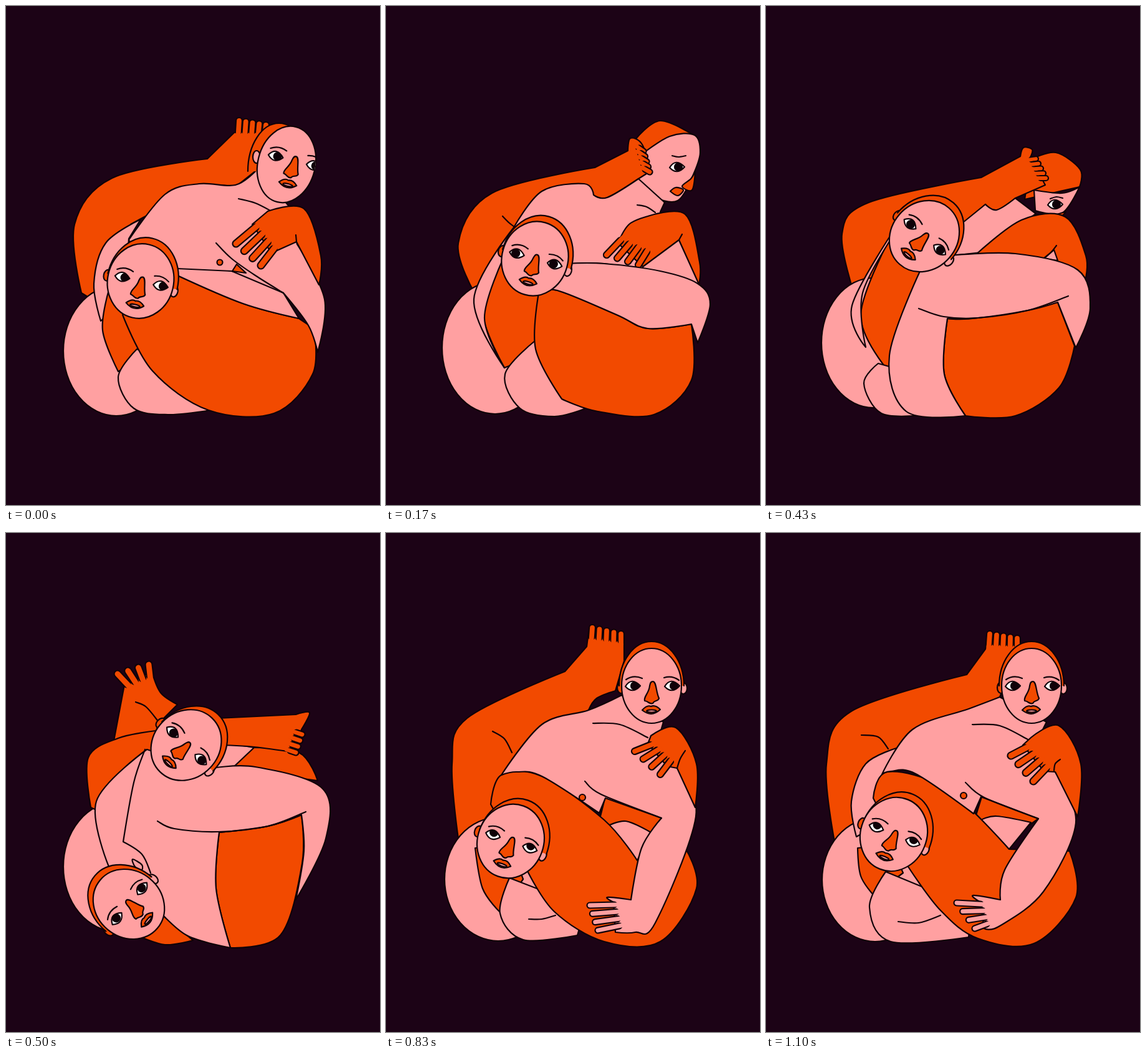
These frames come from a looping animation (600x800 px, 1170 ms). An HTML page with a canvas:

```html
<!DOCTYPE html>
<html lang="en">
<head>
<meta charset="utf-8">
<title>Embrace</title>
<style>
html, body { margin: 0; width: 100%; height: 100%; overflow: hidden; background: #1c0316; }
canvas { display: block; }
</style>
</head>
<body>
<canvas width="600" height="800"></canvas>
<script>
const ctx = document.querySelector('canvas').getContext('2d');
const ORANGE = '#f24a00', PINK = '#ffa0a1', INK = '#100208', NIGHT = '#1c0316';
const LINE = 2.2, LOOP = 1170;

// Smooth curve through a few "x,y" key points; a star marks a corner.
function curve(text, closed) {
  const pts = text.split(' ').map(s => [parseFloat(s), parseFloat(s.split(',')[1]), s.endsWith('*')]);
  const n = pts.length, path = new Path2D();
  const at = i => pts[closed ? (i + n) % n : Math.max(0, Math.min(n - 1, i))];
  const handle = (i, dir) => {
    const [x, y, corner] = at(i), a = at(i - 1), b = at(i + 1), k = corner ? 0 : dir / 6;
    return [x + (b[0] - a[0]) * k, y + (b[1] - a[1]) * k];
  };
  path.moveTo(pts[0][0], pts[0][1]);
  for (let i = 0; i < (closed ? n : n - 1); i++) {
    const end = at(i + 1);
    path.bezierCurveTo(...handle(i, 1), ...handle(i + 1, -1), end[0], end[1]);
  }
  if (closed) path.closePath();
  return path;
}

function paint(path, color) {
  if (color) { ctx.fillStyle = color; ctx.fill(path); }
  ctx.stroke(path);
}
function oval(x, y, rx, ry, color, from = 0, to = 2 * Math.PI) {
  const path = new Path2D();
  path.ellipse(x, y, rx, ry, 0, from, to);
  paint(path, color);
  return path;
}
const orange = pts => paint(curve(pts, true), ORANGE);
const pink = pts => paint(curve(pts, true), PINK);
const line = pts => paint(curve(pts, false));

function bar(x1, y1, x2, y2, width, color) {
  ctx.save();
  ctx.lineWidth = width;
  ctx.strokeStyle = color;
  ctx.beginPath();
  ctx.moveTo(x1, y1);
  ctx.lineTo(x2, y2);
  ctx.stroke();
  ctx.restore();
}

// A row of fingers or toes, spread evenly between the first and the last [root, tip].
function digits(color, count, width, first, last) {
  for (let i = 0; i < count; i++) {
    const [x, y, tipX, tipY] = first.map((v, k) => v + (last[k] - v) * i / (count - 1));
    const inward = 6 / Math.hypot(tipX - x, tipY - y);
    bar(x, y, tipX, tipY, width + LINE, INK);
    bar(x - (tipX - x) * inward, y - (tipY - y) * inward, tipX, tipY, width - LINE, color);
  }
}

const ALMOND = new Path2D('M-12 1Q-2 -15 12 0Q0 14 -12 1z');
const BROWS = new Path2D('M-41 -10Q-29 -18 -15 -12M20 -13Q33 -17 44 -9');
const NOSE = new Path2D('M2 -7C8 -7 7 10 12 20C10 26 5 22 2 28C-4 30 -4 25 -11 24C-13 17 -4 12 -3 0C-2 -5 -1 -7 2 -7z');
const LIPS = new Path2D('M-15 39Q-7 30 -1 33Q6 30 14 38Q0 51 -15 39z');

function eye(x, y, [lookX, lookY]) {
  ctx.save();
  ctx.translate(x, y);
  paint(ALMOND, '#fff');
  ctx.clip(ALMOND);
  oval(lookX, lookY, 6, 6, INK);
  ctx.restore();
}

function head(x, y, tilt, { w = 53, h = 60, look = [0, 0], hair = 0, shift } = {}) {
  ctx.save();
  ctx.translate(x, y);
  ctx.rotate(tilt * Math.PI / 180);
  if (!shift) {
    oval(-w - 1, 3, 6, 9, ORANGE);
    oval(w + 3, 4, 6, 9, PINK);
    oval(hair, 0, w + 4, h + 11, ORANGE, Math.PI, 2 * Math.PI);
  }
  ctx.clip(oval(0, 0, w, h, PINK));
  ctx.translate(...shift || [0, 0]);
  eye(-30, 0, look);
  eye(33, 0, look);
  paint(BROWS);
  paint(NOSE, ORANGE);
  paint(LIPS, ORANGE);
  oval(0, 40.5, 8, 2, PINK);
  ctx.restore();
}

const poses = [
  function turnAway() {
    orange('121,460* 110,350 170,276 323,245* 366,203* 424,192* 402,263* 368,290* 300,300 200,350* 170,490*');
    digits(ORANGE, 5, 10, [373, 200, 374, 184], [416, 200, 417, 191]);
    oval(177, 553, 85, 104, PINK);
    pink('216,342* 160,380 141,445 152,505* 190,470* 197,373*');
    orange('165,455* 155,520 180,586* 240,552* 240,470*');
    pink('210,550* 180,595 205,645 260,655 328,648* 330,600*');
    orange('187,495* 235,585 325,648 430,653 492,590 494,517* 470,501* 380,477 275,432*');
    pink('265,421* 362,425 445,460* 470,501* 380,477 275,432*');
    pink('197,375* 255,302 310,285 368,287 402,263* 455,322* 467,382* 511,470 500,555* 485,512 445,460* 362,425* 275,421* 220,420*');
    orange('363,425* 370,414* 385,428*');
    line('337,380 362,405 400,432 445,460');
    line('373,309 400,316 426,329');
    oval(343, 411, 4.5, 4.5, ORANGE);
    orange('420,329* 478,325 505,400 502,447* 466,378* 426,396* 395,350*');
    digits(ORANGE, 4, 11, [400, 355, 369, 381], [429, 390, 409, 416]);
    line('465,367 466,378');
    oval(438, 265, 50, 77, ORANGE, Math.PI, 2 * Math.PI);
    oval(402, 242, 6, 10, PINK);
    head(450, 254, 14, { w: 46, h: 62, look: [3, 0], shift: [10, -9] });
    head(216, 441, 13, { look: [4, 0], hair: 3 });
  },
  function profile() {
    orange('400,214* 440,184 497,209* 460,225* 410,260*');
    pink('410,238* 455,209 495,207 504,235 494,268* 468,312 425,303 400,270*');
    orange('456,297* 465,291 477,295 468,304');
    orange('496,265* 489,277 475,289 491,295');
    eye(467, 258, [2, 0]);
    line('459,240 469,242 481,240');
    orange('142,460* 116,380 170,300 335,259* 388,232* 392,212 411,222 424,265* 405,277* 355,307 333,303* 300,330* 205,360* 180,480*');
    digits(ORANGE, 5, 9, [406, 228, 413, 233], [416, 262, 423, 266]);
    oval(175, 548, 85, 106, PINK);
    orange('185,405* 155,490 190,580* 240,560* 250,460* 220,420*');
    pink('205,355* 141,470 190,580* 158,500 188,405*');
    pink('240,536* 191,590 215,645 270,658 318,646* 300,590*');
    orange('245,460* 275,456 370,495 420,517 490,510* 490,600 430,655 340,650 282,630* 240,550');
    pink('205,355* 250,297 318,285 333,303* 355,307 405,277* 447,315* 440,330* 470,375* 503,446* 350,413 230,420*');
    orange('420,337* 480,334 503,410 502,446* 470,375* 412,418* 372,380* 390,350');
    digits(ORANGE, 4, 10, [376, 376, 354, 399], [418, 394, 405, 415]);
    line('475,366 470,375');
    pink('240,460* 290,413* 350,413 440,425 500,445 520,478 500,540* 490,510* 420,517 370,495 275,456');
    line('403,319 418,322 432,331');
    line('187,337 198,348 210,357');
    head(239, 405, 16, { look: [-2, 0], hair: 3 });
  },
  function hide() {
    orange('425,246* 465,235 504,262 503,290* 450,302 415,310*');
    pink('430,295* 475,300 503,290* 475,332 432,328*');
    orange('481,330* 474,337 468,334');
    eye(464, 318, [2, 0]);
    line('456,309 466,306 476,308');
    orange('141,460* 122,365 165,315 345,275* 408,241* 413,227 427,230 424,243* 448,287* 400,308* 370,327 352,318* 320,345* 205,375* 180,470*');
    digits(ORANGE, 5, 8, [426, 246, 433, 245], [441, 276, 449, 276]);
    oval(172, 540, 83, 104, PINK);
    orange('205,360* 152,495 198,587* 230,560* 250,423*');
    pink('210,352* 138,480 160,547* 155,460 208,362*');
    pink('180,573* 157,605 185,653 250,656* 240,590*');
    pink('352,318* 370,327 400,308* 433,333* 345,395* 300,400* 300,360*');
    orange('335,400* 410,343 480,338 513,400 512,440* 400,400*');
    pink('446,405* 462,391* 468,408*');
    line('466,384 458,394 446,404');
    orange('291,501* 286,590 320,657* 400,657 470,612 495,545* 468,475* 340,500');
    pink('295,400* 400,397 500,423 520,485 497,548* 468,475* 420,488 340,500 291,501* 286,590 320,657* 225,650 198,560 248,423*');
    line('245,485 285,498 340,500 420,488 485,465');
    head(254, 369, 41, { look: [1, 0] });
  },
  function dive() {
    oval(178, 535, 86, 104, PINK);
    orange('173,333* 190,243* 234,222* 248,256 275,275* 245,305* 238,325*');
    digits(ORANGE, 4, 11, [194, 242, 179, 226], [231, 228, 229, 211]);
    orange('136,440* 132,360 180,329 240,317* 250,350* 180,460*');
    line('208,271 225,279 245,303');
    orange('390,344* 470,352 500,397* 360,378*');
    pink('345,335* 398,344* 362,378* 330,385*');
    orange('340,297* 465,291* 487,288 474,315* 464,352* 398,343 345,340*');
    digits(ORANGE, 4, 9, [466, 320, 475, 323], [456, 349, 465, 352]);
    orange('210,645* 255,660 300,653* 235,600*');
    orange('342,480* 337,570 360,665* 440,645 475,530 474,452* 420,470');
    pink('226,347* 145,430 165,535* 240,600* 290,645 360,665* 337,570 342,480* 420,470 474,452* 478,510 465,588* 513,490 508,410 400,375 325,378*');
    line('243,462 270,474 340,479 420,470 481,447');
    line('223,347 205,400 188,495* 218,515 232,545');
    pink('203,523 207,535 217,541 218,532');
    head(289, 340, 44, { look: [2, 0], hair: 3 });
    head(197, 595, -50, { look: [0, -1] });
  },
  function kick() {
    orange('127,500* 102,400 160,300 235,205 252,165* 255,152* 311,152* 290,207* 285,243 259,246* 262,322* 200,370* 170,490*');
    digits(ORANGE, 5, 10, [258, 156, 251, 137], [307, 162, 312, 149]);
    line('244,236 251,243 259,246');
    line('145,363 170,356 202,360');
    pink('192,372* 158,430 160,475* 190,460*');
    oval(195, 546, 78, 89, PINK);
    orange('495,518* 496,570 460,637* 440,560*');
    orange('186,585* 215,635 260,652 320,648* 300,590*');
    orange('185,455* 215,430 290,438 380,480* 433,473* 440,640* 385,661 270,612 228,565*');
    pink('168,460* 190,385 250,327 320,310* 425,300* 485,340 497,452 465,630* 440,661* 418,650* 412,618* 430,608* 425,530 433,473* 380,480* 290,438 215,430 190,440*');
    digits(PINK, 4, 9, [416, 621, 392, 632], [432, 655, 410, 665]);
    line('260,365 300,367 430,405 497,453');
    orange('418,330* 462,308 483,335 467,365* 428,345*');
    digits(ORANGE, 3, 13, [430, 335, 416, 355], [466, 355, 458, 381]);
    head(356, 322, 50, { look: [2, 0], hair: 3 });
    head(188, 527, 0, { look: [0, -4] });
  },
  function embrace() {
    orange('116,490* 106,370 130,297 287,222* 322,182* 325,158* 382,162* 382,205* 368,253* 338,265 325,284* 200,400* 180,500*');
    digits(ORANGE, 5, 10, [330, 166, 331, 152], [377, 172, 377, 162]);
    line('171,318 190,330 202,352');
    oval(180, 555, 86, 99, PINK);
    orange('143,505* 155,570 183,608* 220,555* 200,500*');
    pink('198,553* 183,610 220,652 307,645* 320,600*');
    line('229,619 250,619 272,613');
    orange('352,422* 442,457* 425,480* 340,470*');
    pink('355,470* 385,462 425,480* 403,525*');
    orange('168,435* 185,388 250,390 350,460 403,525* 480,505* 498,570 440,655 350,655 270,607 226,540*');
    pink('185,388* 250,307 325,284 378,260* 445,303* 440,320* 467,377* 497,455 432,625 400,640 368,640* 365,592* 355,584 393,588* 410,505 442,457* 352,425* 342,449* 250,390 210,383');
    digits(PINK, 4, 9, [366, 596, 327, 597], [374, 630, 340, 637]);
    line('319,398 345,419 442,457');
    line('332,305 375,307 420,328');
    oval(315, 424, 5, 5, ORANGE);
    orange('425,325* 465,312 498,370 496,440* 467,377* 451,374* 420,338*');
    digits(ORANGE, 4, 10, [424, 340, 399, 350], [456, 366, 440, 387]);
    line('480,349 472,362 467,377');
    head(426, 245, 0, { w: 48, look: [3, 0] });
    head(200, 494, 20, { look: [0, -4], hair: 4 });
  },
  function settle() {
    orange('110,495* 97,370 135,287 322,227* 352,186* 354,168* 408,172* 375,263* 325,290 200,365* 180,490*');
    digits(ORANGE, 5, 10, [358, 176, 359, 162], [403, 178, 403, 169]);
    line('153,324 180,327 196,346');
    oval(175, 556, 85, 99, PINK);
    pink('212,344* 160,370 137,430 145,487* 175,470* 190,385*');
    orange('147,505* 152,550 172,580* 220,545* 200,500*');
    pink('192,543* 166,600 200,655 325,648* 330,600*');
    line('212,623 245,625 280,613');
    orange('347,420* 437,458* 420,470* 333,465*');
    pink('345,460* 370,454 425,464* 390,507*');
    orange('172,425* 195,383 290,410 390,507* 487,510* 497,585 430,658 340,650 280,605 228,535*');
    pink('186,387* 235,315 325,282 375,263* 450,303* 440,323* 465,385* 497,465 445,575 375,630 350,634* 344,592* 332,581 376,588* 383,540 437,458* 345,423* 333,450* 240,386 200,382');
    digits(PINK, 4, 9, [344, 595, 306, 593], [354, 627, 335, 634]);
    line('320,400 350,424 437,458');
    line('331,307 375,309 420,331');
    oval(317, 421, 5, 5, ORANGE);
    orange('425,328* 470,309 505,370 500,455* 464,383* 446,382* 412,340*');
    digits(ORANGE, 4, 11, [416, 345, 393, 357], [449, 377, 429, 398]);
    line('472,363 464,370 462,381');
    head(426, 245, 0, { w: 48, look: [3, 0] });
    head(205, 483, 22, { look: [0, -4], hair: 4 });
  },
];

// Six poses a second, on whole hundredths.
const poseEnd = i => 10 * Math.round((i + 1) * 100 / 6);

function draw(now) {
  const time = now % LOOP;
  ctx.fillStyle = NIGHT;
  ctx.fillRect(0, 0, 600, 800);
  ctx.strokeStyle = INK;
  ctx.lineWidth = LINE;
  ctx.lineJoin = ctx.lineCap = 'round';
  poses.find((pose, i) => time < poseEnd(i))();
  requestAnimationFrame(draw);
}
draw(0);
</script>
</body>
</html>
```
